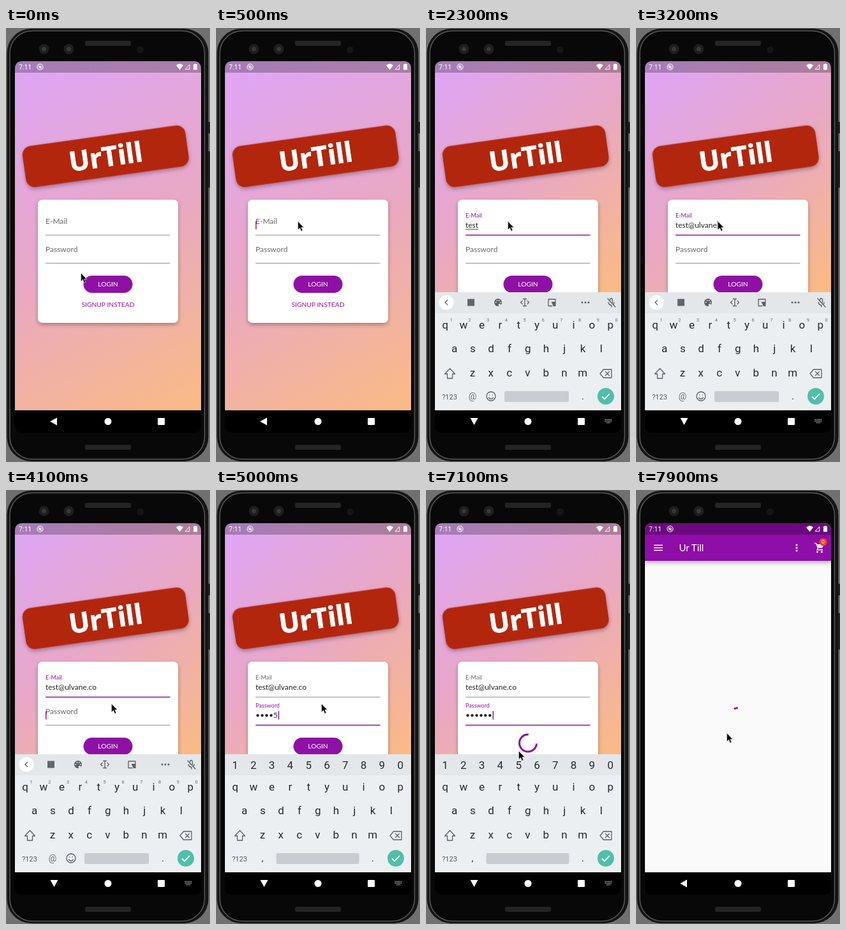
Recreate the animation shown at these times as an HTML page. Size 320 by 680 pixels, loop 8000 ms.

```html
<!DOCTYPE html>
<html lang="en">
<head>
<meta charset="utf-8">
<title>Login screen</title>
<style>
html, body { margin: 0; width: 100%; height: 100%; overflow: hidden; background: #707070; }
svg { display: block; width: 320px; height: 680px; }
.app { font-family: Lato, sans-serif; }
.sys { font-family: Roboto, sans-serif; }
.logo { font: 900 43px "Noto Sans", "Open Sans", sans-serif; stroke: #fff; stroke-width: .8; }
.mid { text-anchor: middle; }
.line { fill: none; stroke: #5a5e63; stroke-width: 1.3; stroke-linecap: round; stroke-linejoin: round; }
</style>
</head>
<body>
<svg viewBox="0 0 320 680">
  <defs>
    <linearGradient id="sky" gradientUnits="userSpaceOnUse" x1="14" y1="52" x2="306" y2="599">
      <stop offset="0" stop-color="#dea5f7"/>
      <stop offset=".5" stop-color="#e8a8c5"/>
      <stop offset="1" stop-color="#fabb83"/>
    </linearGradient>
    <clipPath id="screen"><path d="M14 599V64Q14 52 26 52H294Q306 52 306 64V599Z"/></clipPath>
    <filter id="soft" x="-10%" y="-20%" width="120%" height="150%">
      <feDropShadow dx="0" dy="3" stdDeviation="3" flood-color="#000" flood-opacity=".3"/>
    </filter>
  </defs>

  <!-- phone -->
  <rect width="320" height="680" fill="#707070"/>
  <rect x="316" y="147" width="4" height="18" fill="#222"/>
  <rect x="316" y="193" width="4" height="57" fill="#222"/>
  <rect x="1.500" y="1" width="316" height="678" rx="38" fill="#141414"/>
  <rect x="6" y="4.500" width="305.500" height="671" rx="35" fill="#080808" stroke="#585858" stroke-width="1.500"/>
  <g fill="#242424">
    <rect x="124" y="20" width="72" height="8" rx="2.500"/>
    <rect x="124" y="653" width="72" height="8" rx="2.500"/>
    <circle cx="59.500" cy="33" r="8" fill="#1e1e1e"/>
    <circle cx="98.500" cy="33" r="8" fill="#1e1e1e"/>
    <circle cx="59.500" cy="33" r="3.500" fill="#383838"/>
    <circle cx="98.500" cy="33" r="3.500" fill="#383838"/>
    <circle cx="210.500" cy="34" r="5.500" fill="#151515"/>
  </g>
  <path d="M14 599H306V622Q306 634 294 634H26Q14 634 14 622Z" fill="#000"/>

  <g clip-path="url(#screen)">
    <!-- login page -->
    <g id="login" class="app">
      <rect x="14" y="52" width="292" height="547" fill="url(#sky)"/>
      <g transform="translate(156.300 201) rotate(-8)">
        <rect x="-129" y="-32.500" width="258" height="65" rx="14" fill="#b2260e" filter="url(#soft)"/>
        <text class="logo mid" y="16" fill="#fff">UrTill</text>
      </g>
      <rect x="50" y="269" width="220" height="193" rx="7" fill="#fff" filter="url(#soft)"/>
      <g id="fields" font-size="12"></g>
      <g id="buttons" class="mid" font-size="10.300">
        <rect x="121.500" y="388" width="77" height="27" rx="13.500" fill="#8f10a5"/>
        <text x="160" y="405" fill="#fff">LOGIN</text>
        <text x="160" y="436.500" fill="#8f10a5">SIGNUP INSTEAD</text>
      </g>
    </g>

    <!-- shop page -->
    <g id="shop" class="app">
      <rect x="14" y="52" width="292" height="547" fill="#fafafa"/>
      <rect x="14" y="52" width="292" height="59" fill="#8f10a8" filter="url(#soft)"/>
      <path d="M28 86.500H42M28 90.500H42M28 94.500H42" stroke="#fff" stroke-width="1.400"/>
      <text x="67.500" y="96" font-size="15" fill="#fff">Ur Till</text>
      <g fill="#fff">
        <circle cx="252" cy="86" r="1.600"/><circle cx="252" cy="90.500" r="1.600"/><circle cx="252" cy="95" r="1.600"/>
        <circle cx="284.500" cy="97" r="1.500"/><circle cx="291.500" cy="97" r="1.500"/>
        <path d="M283 85H295L292 91H285Z"/>
        <path d="M280 83.500H282.500L285.500 90.500L284 93.700H293" fill="none" stroke="#fff" stroke-width="1.400"/>
      </g>
      <circle cx="293.500" cy="81.500" r="6" fill="#f3441f"/>
      <text class="mid" x="293.500" y="84.200" font-size="7.500" fill="#fff">0</text>
    </g>
    <path id="ring" fill="none" stroke="#8a12a2" stroke-width="3"/>

    <!-- status bar -->
    <rect x="14" y="52" width="292" height="18" fill="#000" opacity=".25"/>
    <g fill="#fff">
      <text class="sys" x="20" y="65" font-size="10.500">7:11</text>
      <g fill="none" stroke="#fff" stroke-width="1.100">
        <circle cx="53.500" cy="61" r="4.500"/>
        <circle cx="53.500" cy="61" r="1.800"/>
        <path d="M51 58.500L56 64"/>
      </g>
      <path d="M267 58.500Q272.500 53.500 278 58.500L272.500 65.500Z"/>
      <path d="M281 64.800H287.800V57.500Z" fill="none" stroke="#fff"/>
      <path d="M294 57H295.500V56H298.500V57H300V65.500H294Z"/>
    </g>

    <!-- keyboard -->
    <g id="board" class="sys">
      <rect x="14" y="414" width="292" height="185" fill="#eceff2"/>
      <rect x="14" y="414" width="292" height="33" fill="#e4e7ea"/>
      <g id="keys" class="mid" fill="#25282c"></g>
      <path class="line" d="M37.500 533.500L45.500 542H41.500V549H33.500V542H29.500Z"/>
      <path class="line" d="M278.500 535H291V548H278.500L273 541.500ZM281.500 538.500L287.500 544.500M287.500 538.500L281.500 544.500"/>
      <circle cx="282" cy="577" r="13" fill="#4fbfa8"/>
      <path d="M276 577.500L280 581.500L288 573" fill="none" stroke="#fff" stroke-width="1.800"/>
      <g id="mailKeys">
        <circle cx="32" cy="430" r="11.500" fill="#fff"/>
        <path class="line" d="M33.500 426.500L30 430L33.500 433.500"/>
        <rect x="65" y="424.500" width="11" height="11" fill="#62666b"/>
        <circle cx="113" cy="430" r="6" fill="#5a5e63"/>
        <g fill="#e4e7ea">
          <circle cx="109.500" cy="430" r="1"/><circle cx="111.500" cy="427" r="1"/>
          <circle cx="114.700" cy="427" r="1"/><circle cx="116.600" cy="430" r="1"/>
          <circle cx="115.500" cy="434" r="2"/>
        </g>
        <path class="line" d="M152.500 424.500H157.500M155 424.500V435.500M152.500 435.500H157.500M151 427.500L148.500 430L151 432.500M159 427.500L161.500 430L159 432.500"/>
        <path class="line" d="M203 429V425H192V435.500H198"/>
        <path d="M196.500 429H203.500V436H200Z" fill="#5a5e63"/>
        <g fill="#5a5e63"><circle cx="245" cy="430" r="1.500"/><circle cx="250" cy="430" r="1.500"/><circle cx="255" cy="430" r="1.500"/></g>
        <path class="line" d="M285 424L297 437M288.500 429V425.500Q290.500 421.500 292.500 425.500V430M286 430Q287 434 291 434.500V437M295 430Q295 432 294 433"/>
        <circle class="line" cx="102" cy="577" r="7"/>
        <path class="line" d="M98.500 579Q102 583.500 105.500 579M99.700 574.800V575M104.300 574.800V575"/>
        <rect x="123" y="569" width="101" height="17" rx="2" fill="#c9ccd0"/>
      </g>
      <rect id="wideSpace" x="94.500" y="569" width="130" height="17" rx="2" fill="#c9ccd0"/>
    </g>
  </g>

  <!-- navigation bar -->
  <g fill="#fff">
    <path id="back"/>
    <circle cx="160" cy="616.500" r="5.500"/>
    <rect x="238" y="611" width="11" height="11" rx="1"/>
    <path id="toggle" d="M280.500 613.500H292M280.500 616H292M283 618.500H289.500" stroke="#aaa" stroke-width="1.300" stroke-dasharray="1.500 .8"/>
  </g>

  <path id="mouse" d="M0 0V14.500L3.300 11.500L5.700 17L8.200 15.900L5.800 10.500H10.300Z" fill="#080808" stroke="#ddd" stroke-width=".7"/>
</svg>

<script>
const LOOP = 8000, STEP = 100, PURPLE = '#8f10a5', GREY = '#686868';
const $ = id => document.getElementById(id);
const show = (el, on) => el.setAttribute('display', on ? 'inline' : 'none');
const set = (el, attrs) => { for (const k in attrs) el.setAttribute(k, attrs[k]); };

function add(parent, tag, attrs, text = '') {
  const el = document.createElementNS('http://www.w3.org/2000/svg', tag);
  set(el, attrs);
  el.textContent = text;
  return parent.appendChild(el);
}

// Value at time t from rows of [time, ...values]
function track(rows, t) {
  let i = 0;
  while (i < rows.length - 1 && rows[i + 1][0] <= t) i++;
  const a = rows[i], b = rows[i + 1];
  if (!b || t <= a[0]) return a.slice(1);
  const p = (t - a[0]) / (b[0] - a[0]);
  return a.slice(1).map((v, k) => v + (b[k + 1] - v) * p);
}

const MOUSE = [[0, 117.5, 384], [100, 118, 376], [400, 128.5, 303], [3600, 128.5, 303],
  [3900, 165.5, 335], [5200, 165.5, 335], [5600, 158, 399], [5800, 155, 402],
  [6000, 135.5, 412], [6500, 135.5, 412], [7100, 145.5, 409], [7900, 142.5, 381]];
const BOARD = [[500, 0], [600, .45], [700, .88], [800, 1], [7400, 1], [7500, .6], [7600, .12], [7700, 0]];
const MAIL_FLOAT = [[500, 0], [600, .7], [700, 1]];
const PASS_FLOAT = [[4100, 0], [4200, .7], [4300, 1]];

const MAIL = 'test@ulvane.co';
const MAIL_KEYS = [900, 1000, 1100, 1200, 2500, 2800, 2900, 3000, 3100, 3200, 3200, 3400, 3500, 3600];
const PASS = '123456';
const PASS_KEYS = [4600, 4700, 4800, 4900, 5000, 5200];
const RESETS = [500, ...MAIL_KEYS, 4100, ...PASS_KEYS];
const typed = (keys, t) => keys.filter(k => k <= t).length;

// Keyboard letters
const PITCH = 28.8, keys = $('keys');
function keyRow(chars, x, y, parent = keys, size = 17) {
  [...chars].forEach((c, i) => add(parent, 'text', { x: x + i * PITCH, y, 'font-size': size }, c));
}
keyRow('qwertyuiop', 30, 471);
keyRow('asdfghjkl', 44.5, 508.4);
keyRow('zxcvbnm', 73, 545.8);
keyRow('.', 246, 582, keys, 15);
add(keys, 'text', { x: 37, y: 581.5, 'font-size': 11, fill: '#505459' }, '?123');
const hints = add(keys, 'g', { fill: '#666a70' });
keyRow('1234567890', 39.5, 459.5, hints, 7.5);
keyRow('@', 73, 582, hints, 14);
const digits = add(keys, 'g', {});
keyRow('1234567890', 30, 437, digits);
keyRow(',', 73, 582, digits, 14);

// A text field with floating label, underline and caret
function makeField(label, top) {
  const g = $('fields');
  const name = add(g, 'text', {}, label);
  const value = add(g, 'text', { x: 62, y: top + 10.8, fill: '#222' });
  const under = add(g, 'path', { stroke: '#333', 'stroke-width': .9 });
  const rule = add(g, 'path', { d: `M62 ${top + 22}H257.5` });
  const caret = add(g, 'rect', { y: top, width: 1.5, height: 13, fill: PURPLE });
  return (text, lift, active, blink, composing) => {
    const lit = active && lift > 0;
    set(name, { transform: `translate(62 ${top + 4 - 9.5 * lift}) scale(${1 - .25 * lift})`,
      fill: lit ? PURPLE : GREY });
    value.textContent = text;
    const end = 62 + (text ? value.getComputedTextLength() : 0);
    set(rule, { stroke: lit ? PURPLE : '#888', 'stroke-width': lit ? 1.6 : .9 });
    set(caret, { x: end + (text ? .8 : 0) });
    show(caret, blink);
    set(under, { d: `M62 ${top + 12.8}H${end}` });
    show(under, composing);
  };
}
const mailField = makeField('E-Mail', 302.5);
const passField = makeField('Password', 346.5);

// Material easing, cubic-bezier(.4, 0, .2, 1)
function ease(x) {
  if (x <= 0) return 0;
  if (x >= 1) return 1;
  let lo = 0, hi = 1, u;
  for (let i = 0; i < 20; i++) {
    u = (lo + hi) / 2;
    const bx = 1.2 * u * (1 - u) ** 2 + .6 * u * u * (1 - u) + u ** 3;
    if (bx < x) lo = u; else hi = u;
  }
  return 3 * u * u * (1 - u) + u ** 3;
}

function arc(age, cx, cy, r) {
  const c = age / 1333 % 1;
  const head = ease(c * 2), tail = ease(c * 2 - 1);
  const from = Math.PI * (-.5 + 1.5 * tail + 2 * age / 2222 + .5 * age / 1333);
  const sweep = Math.max(1.5 * Math.PI * (head - tail), .05);
  const at = a => `${cx + r * Math.cos(a)} ${cy + r * Math.sin(a)}`;
  return `M${at(from)}A${r} ${r} 0 ${sweep > Math.PI ? 1 : 0} 1 ${at(from + sweep)}`;
}

function draw(t) {
  const shop = t >= 7400, waiting = t >= 5900, inPass = t >= 4100;
  const [up] = track(BOARD, t);
  show($('login'), !shop);
  show($('shop'), shop);
  set($('sky'), { y2: 599 - 185 * up });
  show($('board'), up > 0);
  set($('board'), { transform: `translate(0 ${185 * (1 - up)})` });

  const numeric = t >= 4300;
  for (const el of [hints, $('mailKeys')]) show(el, !numeric);
  for (const el of [digits, $('wideSpace')]) show(el, numeric);

  const last = RESETS.filter(k => k <= t).pop();
  const blink = last !== undefined && Math.floor((t - last) / 300) % 2 === 0;
  const n = typed(MAIL_KEYS, t), m = typed(PASS_KEYS, t);
  const secret = t < 6300 && m ? '•'.repeat(m - 1) + PASS[m - 1] : '•'.repeat(m);
  mailField(MAIL.slice(0, n), track(MAIL_FLOAT, t)[0], t >= 500 && t < 4200, blink && !inPass, n > 0 && n < 5);
  passField(secret, track(PASS_FLOAT, t)[0], inPass, blink && inPass, false);

  show($('buttons'), !waiting);
  show($('ring'), waiting);
  if (waiting) {
    const d = shop ? arc(1450 + (t - 7900) * 1.64, 160, 355, 13.5)
                   : arc((t - 5895) * 1.64, 160, 396.5, 13.5);
    set($('ring'), { d });
  }

  set($('back'), { d: up > 0 ? 'M69.500 611H81.500L75.500 622Z' : 'M80 610.500V622.500L69 616.500Z' });
  show($('toggle'), up > 0);
  set($('mouse'), { transform: `translate(${track(MOUSE, t).join(' ')}) scale(.9)` });
}

const start = performance.now();
function tick() {
  const t = (performance.now() - start) % LOOP;
  draw(Math.floor(t / STEP) * STEP);
  requestAnimationFrame(tick);
}
tick();
</script>
</body>
</html>
```
